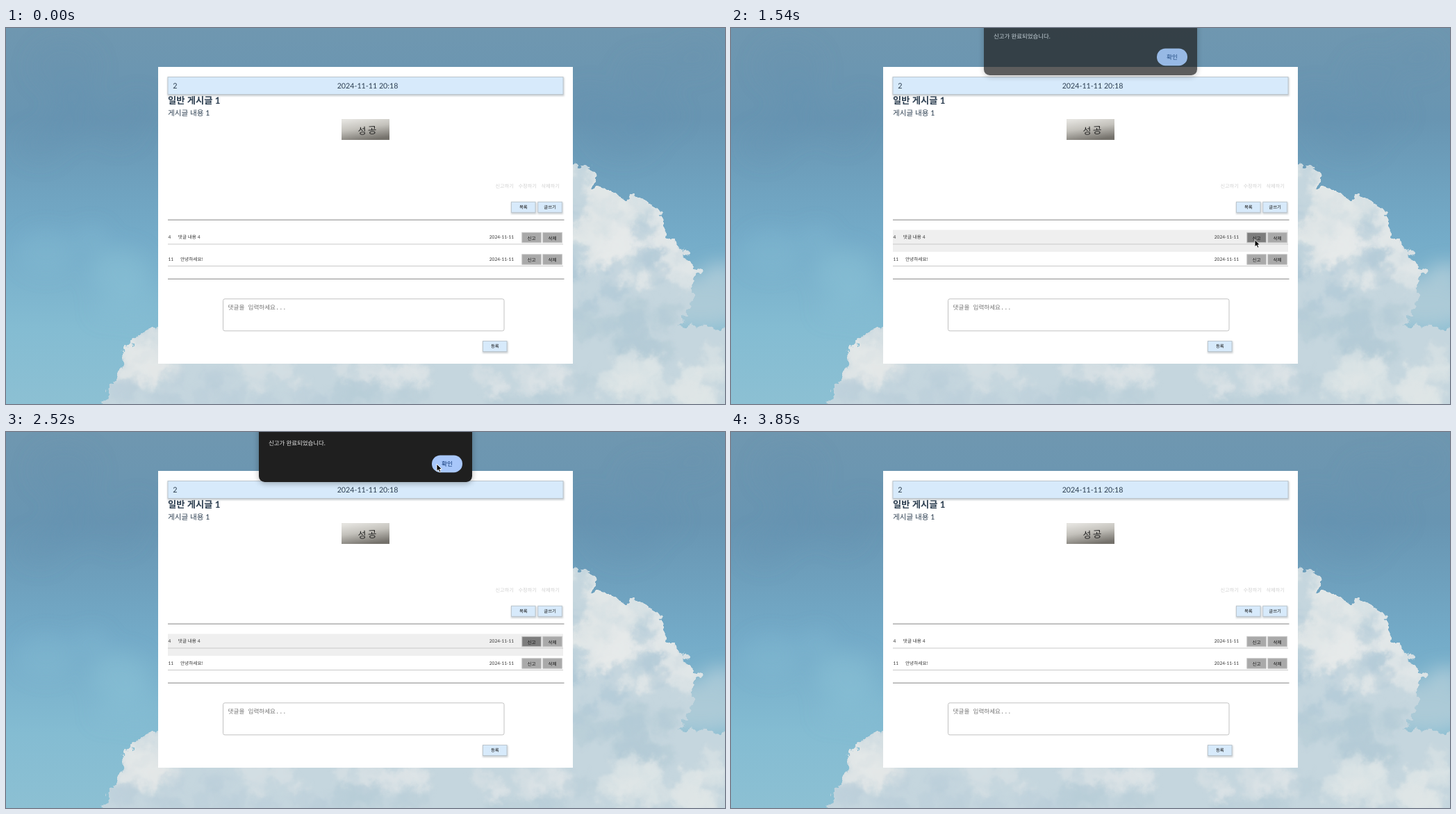
Write an HTML page that moves like this. It is 1035 px wide and 541 px high and loops after 3920 ms.

```html
<!DOCTYPE html>
<html lang="ko">
<head>
<meta charset="utf-8">
<title>게시글</title>
<style>
  html, body { margin: 0; width: 100%; height: 100%; overflow: hidden; background: #7097b0; }
  svg { position: absolute; left: 0; top: 0; width: 1035px; height: 541px; display: block; }
  #sky { will-change: transform; }
  text { font-family: Lato, "Noto Sans CJK KR", "Noto Sans CJK JP", "Noto Sans CJK", sans-serif; text-rendering: geometricPrecision; white-space: pre; }
  .mono { font-family: "Liberation Mono", "Noto Sans CJK KR", "Noto Sans CJK JP", "Noto Sans CJK", monospace; }
</style>
</head>
<body>
<svg id="sky" viewBox="0 0 1035 541"></svg>
<svg id="page" viewBox="0 0 1035 541"></svg>
<script>
const LOOP = 3920, TICK = 70;
const $ = id => document.getElementById(id);

// Sky and clouds
let seed = 11;
const rnd = () => (seed = (seed * 16807) % 2147483647) / 2147483647;
const blobs = (n, x0, y0, x1, y1, color, r, alpha) => Array.from({ length: n }, () => {
  const size = r * (0.45 + rnd() * 0.55);
  return `<ellipse cx="${x0 + rnd() * (x1 - x0)}" cy="${y0 + rnd() * (y1 - y0)}" rx="${size * 1.25}" ry="${size}" fill="${color}" opacity="${alpha}"/>`;
}).join('');

$('sky').innerHTML = `
<defs>
  <linearGradient id="air" x2="0" y2="1">
    <stop offset="0" stop-color="#6f97b0"/><stop offset=".24" stop-color="#6895b2"/>
    <stop offset=".55" stop-color="#74abc8"/><stop offset=".8" stop-color="#84bcd2"/>
    <stop offset="1" stop-color="#8cc0d3"/>
  </linearGradient>
  <filter id="rough" x="-5%" y="-5%" width="110%" height="110%">
    <feTurbulence type="fractalNoise" baseFrequency=".055" numOctaves="4" seed="4"/>
    <feDisplacementMap in="SourceGraphic" scale="26" xChannelSelector="R" yChannelSelector="G"/>
  </filter>
  <filter id="soft"><feGaussianBlur stdDeviation="4"/></filter>
  <filter id="haze" x="-40%" y="-60%" width="180%" height="220%"><feGaussianBlur stdDeviation="14"/></filter>
  <clipPath id="cloud"><path d="M143 560 Q146 515 164 498 Q160 468 184 452 Q196 436 222 432 L500 300 L800 200
    Q834 186 847 209 L844 227 Q868 228 884 244 Q920 238 936 262 Q954 280 950 299 Q976 312 985 335
    L1000 350 L988 376 Q990 404 970 428 Q1000 436 1060 428 V560 Z"/></clipPath>
</defs>
<rect width="1035" height="541" fill="url(#air)"/>
<g filter="url(#haze)">
  ${blobs(7, 0, 40, 220, 220, '#5f8dab', 45, 0.16)}
  ${blobs(6, 820, 40, 1035, 160, '#5f8dab', 45, 0.16)}
  ${blobs(6, 0, 300, 200, 430, '#93c8da', 34, 0.2)}
  <ellipse cx="1000" cy="396" rx="75" ry="38" fill="#b4ced9" opacity=".85"/>
  <ellipse cx="1030" cy="350" rx="26" ry="7" fill="#c8d9e0"/>
</g>
<g filter="url(#rough)"><g clip-path="url(#cloud)">
  <rect x="130" y="180" width="930" height="380" fill="#c5d6de"/>
  <g filter="url(#soft)">
    ${blobs(26, 810, 200, 900, 330, '#e3e8e8', 20, 0.6)}
    ${blobs(30, 860, 245, 985, 370, '#e6eae9', 22, 0.6)}
    ${blobs(14, 815, 270, 940, 430, '#a8c4d3', 17, 0.5)}
    ${blobs(14, 815, 400, 960, 480, '#b3cad6', 20, 0.55)}
    ${blobs(24, 170, 440, 240, 510, '#e3e8e8', 17, 0.55)}
    ${blobs(22, 150, 500, 520, 545, '#b9ced9', 18, 0.5)}
    ${blobs(24, 330, 485, 830, 520, '#e0e6e7', 18, 0.5)}
    ${blobs(14, 450, 510, 850, 545, '#b7cdd8', 17, 0.5)}
    ${blobs(22, 860, 465, 1035, 545, '#e2e7e8', 20, 0.5)}
  </g>
</g></g>`;

// Page pieces
const text = (x, y, size, s, fill = '#333', extra = '') =>
  `<text x="${x}" y="${y}" font-size="${size}" fill="${fill}" ${extra}>${s}</text>`;
const rect = (x, y, w, h, fill, extra = '') =>
  `<rect x="${x}" y="${y}" width="${w}" height="${h}" fill="${fill}" ${extra}/>`;
const mid = 'text-anchor="middle"';

const blueBox = (x, y, w, h) =>
  rect(x, y + 1, w + 1, h + 1, '#8b949c', 'opacity=".45" filter="url(#lift)"') +
  rect(x + .5, y + .5, w - 1, h - 1, '#d7eafb', 'stroke="#b9c3cb" stroke-width=".9"');
const blueButton = (x, y, s) => blueBox(x, y, 35.5, 16) + text(x + 17.8, y + 10.2, 6.4, s, '#111', mid);
const greyButton = (x, y, s, id = '') =>
  rect(x, y, 27.5, 14.5, '#a9a9a9', `id="${id}" stroke="#c4c4c4" stroke-width="1"`) +
  text(x + 13.8, y + 10.2, 6.5, s, '#111', mid);
const rule = y => rect(233, y - .6, 570.5, 1.5, '#adadad');
const row = (y, no, x, s, id) =>
  rect(233, y + 10, 569, 1, '#c9c9c9') +
  text(233.5, y + 2.5, 6.6, no) + text(x, y + 2.5, 6.65, s) + text(695.8, y + 2.5, 6.55, '2024-11-11') +
  greyButton(742.8, y - 6.2, '신고', id) + greyButton(772.8, y - 6.2, '삭제');

$('page').innerHTML = `
<defs>
  <filter id="lift" x="-10%" y="-30%" width="120%" height="170%"><feGaussianBlur stdDeviation="1"/></filter>
  <filter id="drop" x="-10%" y="-20%" width="120%" height="150%"><feGaussianBlur stdDeviation="4"/></filter>
  <linearGradient id="paper" x1=".25" y1="0" x2=".6" y2="1">
    <stop offset="0" stop-color="#e4e3df"/><stop offset=".45" stop-color="#c3c1bb"/>
    <stop offset="1" stop-color="#74716b"/>
  </linearGradient>
</defs>
${rect(219, 56, 597, 427, '#fff')}
${blueBox(232.5, 70, 570, 26)}
${text(240.3, 86.6, 10.8, '2', '#2c3e50')}
${text(520.5, 86.6, 10.7, '2024-11-11 20:18', '#2c3e50', mid)}
${text(233, 109.3, 13.3, '일반 게시글 1', '#2c3e50', 'font-weight="700"')}
${text(233, 125.6, 10.6, '게시글 내용 1', '#2c3e50')}
${rect(483, 131, 69, 30, 'url(#paper)')}
${text(506.5, 152.6, 13, '성', '#222', 'transform="rotate(-3 512 148)"')}
${text(521, 151.8, 13.6, '공', '#222', 'transform="rotate(-4 527 147)"')}
${['신고하기', '수정하기', '삭제하기'].map((s, i) => text(704.5 + 33 * i, 230.3, 7.2, s, '#cfcfcf')).join('')}
${blueButton(727, 249.8, '목록')}${blueButton(765.3, 249.8, '글쓰기')}
${rule(276)}
${rect(233, 290.5, 569, 31.5, '#efefef', 'id="rowHover"')}
${row(300.5, '4', 247.8, '댓글 내용 4', 'report')}
${row(332, '11', 251, '안녕하세요!', '')}
${rule(361)}
${rect(312.5, 389.8, 404.5, 46, '#fff', 'id="field" rx="2.5"')}
${text(319.6, 405.2, 8.6, '댓글을 입력하세요...', '#757575', 'class="mono"')}
${rect(319.6, 396.5, 1, 11, '#111', 'id="caret"')}
${blueButton(686, 450, '등록')}
<g id="dialog">
  ${rect(364, -20, 307, 94, '#000', 'rx="9" opacity=".3" filter="url(#drop)"')}
  ${rect(364, -20, 307, 92, '#1f1f1f', 'rx="8.5"')}
  ${text(378, 18.8, 8.45, '신고가 완료되었습니다.', '#e8e8e8')}
  ${rect(613, 33.5, 44, 24.7, '#a8c7fa', 'rx="12.3"')}
  ${text(635, 49, 8.6, '확인', '#062e6f', mid)}
</g>
<g id="cursor" stroke-linejoin="round">
  <path id="arrow" d="M0 0V10.4L2.4 8.2L4 11.8L5.8 11L4.3 7.5H7.4Z" fill="#000" stroke="#fff" stroke-width=".9"/>
  <path id="hand" d="M-1 .2Q0 -1 1 .2L1.4 4.2Q2.4 3.4 3 4.6Q4 4 4.4 5.2Q5.6 4.8 5.7 6.2Q5.8 9 4.4 11.6H-.8Q-1.6 9.4-3.6 7.4Q-3.6 5.8-2 6.4L-.6 7.4Z
    M1.2 7.2V9.8M2.7 7.2V9.8" fill="#fff" stroke="#111" stroke-width=".8"/>
</g>`;

// Each key: time, x, y
const PATH = [
  [210, 952, 447], [560, 752, 302], [630, 749, 299], [700, 749, 299], [840, 752, 302], [1050, 754, 304.5],
  [1750, 754, 304.5], [1960, 560, 52], [2030, 565, 52], [2100, 565, 52], [2380, 613, 48], [2520, 620, 46],
  [2660, 620, 46], [2870, 630, 43], [3220, 630, 43], [3570, 526, 450], [3710, 526, 450], [3780, 526, 466]
];
// Each key: time, opacity, vertical shift
const DIALOG = [
  [1400, 0, -8], [1470, .35, -6], [1540, .72, -4], [1610, .94, -2], [1680, 1, 0],
  [2730, 1, 0], [2800, .6, 0], [2870, .2, 0], [2940, 0, 0]
];

function at(keys, t) {
  if (t <= keys[0][0]) return keys[0].slice(1);
  for (let i = 1; i < keys.length; i++) {
    const a = keys[i - 1], b = keys[i];
    if (t <= b[0]) {
      const k = (t - a[0]) / (b[0] - a[0]);
      return [1, 2].map(n => a[n] + (b[n] - a[n]) * k);
    }
  }
  return keys[keys.length - 1].slice(1);
}

const during = (t, from, to) => t >= from && t < to;
const show = (id, on) => $(id).setAttribute('visibility', on ? 'visible' : 'hidden');

function draw(now) {
  const t = Math.floor((now % LOOP) / TICK) * TICK;
  const hover = during(t, 840, 3080), focus = during(t, 840, 1400), hand = during(t, 840, 1470);
  const visible = during(t, 210, 3850);

  show('rowHover', hover);
  $('report').setAttribute('fill', hover ? '#7d7d7d' : '#a9a9a9');
  $('field').setAttribute('stroke', focus ? '#14549a' : '#c2c2c2');
  $('field').setAttribute('stroke-width', focus ? 1.8 : 1);
  show('caret', focus);

  const [alpha, shift] = at(DIALOG, t);
  $('dialog').setAttribute('opacity', alpha);
  $('dialog').setAttribute('transform', `translate(0 ${shift})`);

  const [x, y] = at(PATH, t);
  $('cursor').setAttribute('transform', `translate(${x} ${y})`);
  show('arrow', visible && !hand);
  show('hand', visible && hand);
}

const start = performance.now();
function loop() {
  draw(performance.now() - start);
  requestAnimationFrame(loop);
}
loop();
</script>
</body>
</html>
```
